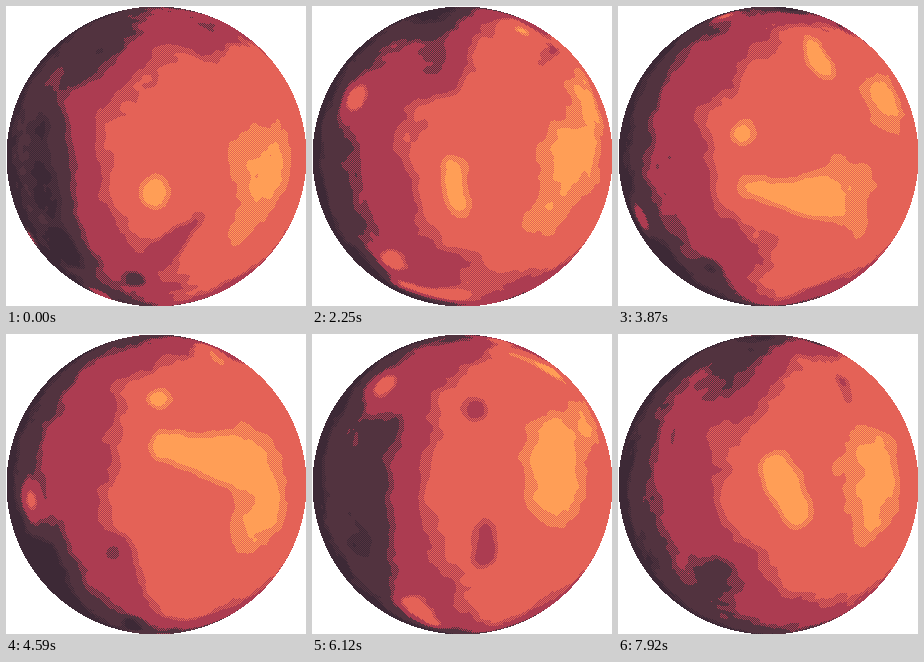
Recreate the animation shown at these times as an HTML page with a canvas. Size 300 px wide and 300 px high, loop 8 s.

```html
<!DOCTYPE html>
<html lang="en">
<head>
<meta charset="utf-8">
<title>Rotating planet</title>
<style>
  html, body { margin: 0; width: 100%; height: 100%; overflow: hidden; background: #fff; }
  canvas { display: block; width: 100%; height: 100%; image-rendering: pixelated; }
</style>
</head>
<body>
<canvas id="planet" width="300" height="300"></canvas>
<script>
const SIZE = 300, LOOP = 8000, STEP = 90;
const DRIFT = { x: 0.134, y: -0.331 };   // surface travel per second
const LIGHT = { x: 0.52, y: -0.05 };
const PALETTE = ["#ff9e56", "#e46257", "#ac3c51", "#52333f", "#3d2936"]
  .map(hex => [1, 3, 5].map(i => parseInt(hex.slice(i, i + 2), 16)));

const hash = (x, y) => {
  const v = Math.sin(x * 12.9898 + y * 78.233) * 43758.5453;
  return v - Math.floor(v);
};
const ease = v => v * v * (3 - 2 * v);
const mix = (a, b, k) => a + (b - a) * k;
const clamp = (v, low, high) => Math.max(low, Math.min(high, v));

function noise(x, y) {
  const ix = Math.floor(x), iy = Math.floor(y);
  const kx = ease(x - ix), ky = ease(y - iy);
  return mix(mix(hash(ix, iy), hash(ix + 1, iy), kx),
             mix(hash(ix, iy + 1), hash(ix + 1, iy + 1), kx), ky) - 0.5;
}

function roughness(x, y) {
  let sum = 0;
  for (let scale = 7, weight = 0.14; scale < 30; scale *= 2, weight *= 0.75) {
    sum += weight * noise(x * scale, y * scale);
  }
  return sum;
}

// A landform is a soft stroke between two surface points.
const landform = (strength, r) => (x, y, x2 = x, y2 = y) =>
  ({ strength, r, x, y, dx: x2 - x, dy: y2 - y });
const ridge = landform(0.36, 0.13);
const crater = landform(0.4, 0.06);
const plain = landform(-0.32, 0.17);
const dune = landform(-0.68, 0.075);

const surface = [
  ridge(-0.25, -0.4, -0.15, -0.53),
  ridge(0.2, -0.45, 0.29, -0.67),
  ridge(-0.43, -0.1, -0.4, 0.42),
  ridge(-1.1, 1.85, -1.17, 2.24),
  ridge(-1.21, 2.96),
  crater(0.16, 0.22, 0.03, 0.355),
  crater(-0.09, 0.518),
  crater(-0.766, 1.757),
  crater(-0.73, 2.17, -0.74, 2.28),
  plain(0.43, 0.08, 0.3, 0.45),
  plain(0.14, 0.76, 0, 1),
  plain(-0.24, 1.43, -0.18, 1.66),
  plain(-0.47, 1.86, -0.45, 2.06),
  plain(-0.67, 2.55, -0.64, 2.75),
  dune(-0.015, 0.125),
  dune(-0.333, 0.78, -0.325, 0.91),
  dune(-0.61, 1.2),
  dune(-0.6, 1.39, -0.36, 1.43),
  dune(-0.76, 0.497),
  dune(-1.17, 1.587),
  dune(-1.05, 2.57, -0.97, 2.72)
];

function elevation(x, y, forms) {
  let height = roughness(x, y);
  for (const f of forms) {
    const ax = x - f.x, ay = y - f.y;
    const length2 = f.dx * f.dx + f.dy * f.dy;
    const k = length2 ? clamp((ax * f.dx + ay * f.dy) / length2, 0, 1) : 0;
    const ex = ax - k * f.dx, ey = ay - k * f.dy;
    const q = (ex * ex + ey * ey) / (f.r * f.r);
    if (q < 5) height += f.strength * Math.exp(-q);
  }
  return height;
}

// Sphere projection and lighting do not change over time.
const pixels = [];
for (let py = 0; py < SIZE; py++) {
  for (let px = 0; px < SIZE; px++) {
    const cx = px * 2 / SIZE - 1, cy = py * 2 / SIZE - 1;
    const rr = cx * cx + cy * cy;
    if (rr >= 1) continue;
    const z = 1 + Math.sqrt(1 - rr), x = cx / z, y = cy / z;
    const distance = Math.hypot(x - LIGHT.x, 1.12 * (y - LIGHT.y));
    pixels.push({
      x, y,
      shade: 1.15 + 1.85 * Math.pow(distance, 2.2),
      checker: (px + py) % 2,
      offset: (py * SIZE + px) * 4
    });
  }
}

const context = document.getElementById("planet").getContext("2d");
const image = context.createImageData(SIZE, SIZE);

function draw(seconds) {
  const dx = -DRIFT.x * seconds, dy = -DRIFT.y * seconds;
  const visible = surface.filter(f => Math.hypot(f.x - dx, f.y - dy) < 2);
  for (const p of pixels) {
    const level = p.shade * Math.exp(elevation(p.x + dx, p.y + dy, visible));
    const shaded = p.checker ? level * 1.025 + 0.04 : level * 0.975 - 0.04;
    const color = PALETTE[clamp(Math.floor(shaded), 0, 4)];
    image.data.set(color, p.offset);
    image.data[p.offset + 3] = 255;
  }
  context.putImageData(image, 0, 0);
}

const start = performance.now();
let shown = -1;
function tick() {
  const step = Math.floor((performance.now() - start) % LOOP / STEP);
  if (step !== shown) {
    shown = step;
    draw(step * STEP / 1000);
  }
  requestAnimationFrame(tick);
}
tick();
</script>
</body>
</html>
```
